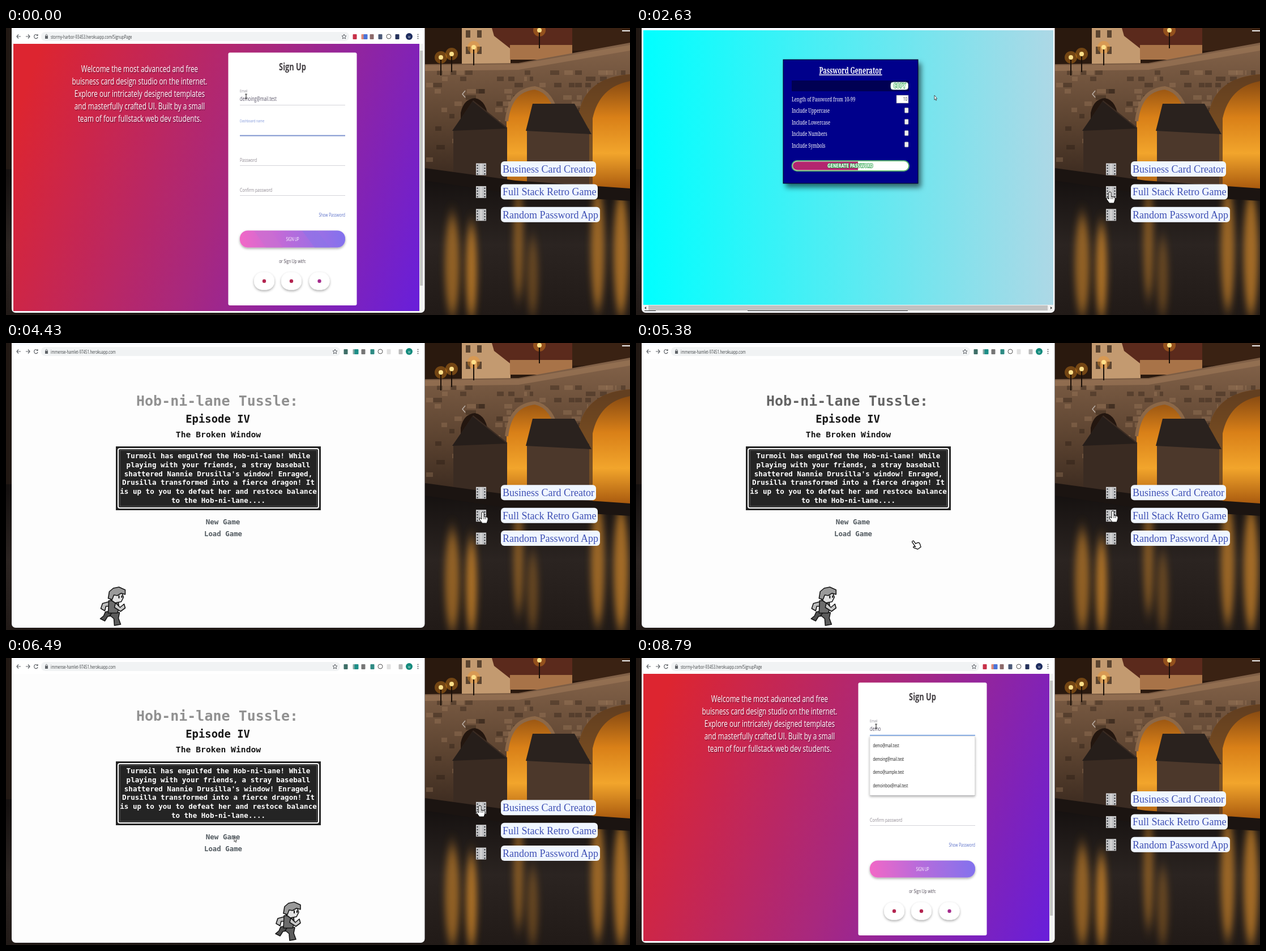
Recreate the animation shown at these times as an HTML page. Size 1102 by 508 pixels, loop 8960 ms.

```html
<!DOCTYPE html>
<html lang="en">
<head>
<meta charset="utf-8">
<title>Project carousel</title>
<style>
  html, body { margin: 0; width: 100%; height: 100%; overflow: hidden; background: #17110e; }
  svg { display: block; width: 1102px; height: 508px; }
  text { white-space: pre; }
</style>
</head>
<body>
<svg id="stage" viewBox="0 0 1102 508" xmlns="http://www.w3.org/2000/svg"></svg>
<script>
const LOOP = 8960, TICK = 79.2, ANCHOR = 4430;
const TO_PASSWORD = 1700, TO_GAME = 4260, TO_SIGNUP = 6650;
const SQUEEZE = 0.69; // the recorded browser pages are narrowed as a whole
const SANS = "'Open Sans','Noto Sans',sans-serif";
const SERIF = "'Noto Serif',serif";
const MONO = "'DejaVu Sans Mono',monospace";
const HEAVY = "'DejaVu Sans',sans-serif";

const rect = (x, y, w, h, fill, more = '') =>
  `<rect x="${x}" y="${y}" width="${w}" height="${h}" fill="${fill}" ${more}/>`;
const circle = (x, y, r, fill, more = '') =>
  `<circle cx="${x}" cy="${y}" r="${r}" fill="${fill}" ${more}/>`;
const path = (d, fill, more = '') => `<path d="${d}" fill="${fill}" ${more}/>`;
const line = (d, color, width = 1, more = '') =>
  path(d, 'none', `stroke="${color}" stroke-width="${width}" ${more}`);
const group = (id, body, more = '') => `<g id="${id}" ${more}>${body}</g>`;

function label(x, y, str, size, fill, o = {}) {
  return `<text transform="translate(${x} ${y}) scale(${o.squeeze ?? SQUEEZE} 1)" font-size="${size}" fill="${fill}"
    font-family="${o.font ?? SANS}" font-weight="${o.weight ?? 400}" text-anchor="${o.anchor ?? 'start'}"
    ${o.id ? `id="${o.id}"` : ''} ${o.more ?? ''}>${str}</text>`;
}

function gradient(id, x1, y1, x2, y2, ...colors) {
  const stops = colors.map((c, i) => `<stop offset="${i / (colors.length - 1)}" stop-color="${c}"/>`);
  return `<linearGradient id="${id}" gradientUnits="userSpaceOnUse" x1="${x1}" y1="${y1}" x2="${x2}" y2="${y2}">${stops.join('')}</linearGradient>`;
}

let seed = 7;
const random = () => (seed = seed * 16807 % 2147483647) / 2147483647;

const defs = `<defs>
  ${gradient('sunset', 30, 120, 760, 380, '#dd2530', '#a8287e', '#6a1fd8')}
  ${gradient('aqua', 13, 0, 737, 0, '#00ffff', '#add8e6')}
  ${gradient('button', 413, 385, 599, 362, '#f268c6', '#b46cdc', '#8272ee')}
  ${gradient('wall', 0, 40, 0, 290, '#806047', '#5d4431', '#33241b')}
  ${gradient('glow', 0, 95, 0, 285, '#8a4c12', '#d98018', '#f2a52c', '#a8590e')}
  ${gradient('water', 0, 260, 0, 508, '#14100f', '#2b2421', '#211a17')}
  <filter id="blur" x="-100%" width="300%" y="-20%" height="140%"><feGaussianBlur stdDeviation="6 14"/></filter>
  <filter id="soft" x="-20%" y="-50%" width="140%" height="220%"><feDropShadow dx="0" dy="2" stdDeviation="2" flood-opacity=".35"/></filter>
  <filter id="lift" x="-20%" y="-20%" width="150%" height="150%"><feDropShadow dx="5" dy="7" stdDeviation="5" flood-opacity=".55"/></filter>
  <clipPath id="page"><rect x="13" y="4" width="724" height="497"/></clipPath>
</defs>`;

function photo() {
  let s = rect(0, 0, 1102, 508, '#211813') + rect(740, 0, 362, 100, '#2a190e');
  s += rect(805, 0, 86, 66, '#c39a70') + path('M858,0H1010V36H890L862,14Z', '#5b2a1c');
  s += rect(890, 30, 110, 26, '#a87348') + rect(1000, 0, 102, 40, '#3a2213');
  for (let x = 812; x < 850; x += 20) s += rect(x, 4, 8, 13, '#5b4430') + rect(x, 33, 8, 13, '#5b4430');
  s += rect(0, 250, 1102, 258, 'url(#water)');
  const streaks = [[788, 420, 13, 90, .6], [822, 430, 10, 85, .75], [905, 380, 9, 100, .5],
    [930, 440, 10, 70, .35], [1045, 390, 12, 110, .65], [1086, 400, 13, 110, .7]];
  for (const [x, y, rx, ry, a] of streaks)
    s += `<ellipse cx="${x}" cy="${y}" rx="${rx}" ry="${ry}" fill="#d58a2c" opacity="${a}" filter="url(#blur)"/>`;
  s += path('M740,64L905,62L1102,26V292L740,254Z', 'url(#wall)');
  for (let i = 0; i < 130; i++) {
    const x = 742 + random() * 350, y = 75 + Math.floor(random() * 16) * 11;
    s += rect(x.toFixed(), y, 9 + Math.round(random() * 9), 8, random() < .5 ? '#a98463' : '#1c110b', 'opacity=".3"');
  }
  s += path('M740,66L905,64L1102,30V40L905,74L740,76Z', '#9a7656', 'opacity=".7"');
  s += path('M803,235V150Q808,126 828,124Q850,128 852,165V245Z', '#23160f') + path('M842,240V180L853,172V246Z', 'url(#glow)');
  s += path('M884,272V160Q890,110 934,106Q966,112 976,165V280Z', 'url(#glow)');
  s += path('M1012,290V150Q1024,88 1102,82V292Z', 'url(#glow)');
  s += path('M1012,290V150Q1024,88 1102,82V94Q1048,104 1036,160V290Z', '#5b3d24', 'opacity=".8"');
  s += path('M884,165Q890,110 934,106Q966,112 976,165', 'none', 'stroke="#8c6848" stroke-width="6"');
  s += path('M790,180L825,128L885,176V272L790,260Z', '#3a2b22') + path('M788,182L824,130L884,178Z', '#261e1a');
  s += path('M920,178H1030V288H920Z', '#4c382b') + path('M918,182L930,134H1004L1034,188Z', '#2a221e');
  s += path('M740,248L900,270L1102,284V306L900,294L740,270Z', '#1b1411');
  for (const [x, y] of [[768, 52], [787, 46], [826, 34], [942, 4]])
    s += circle(x, y, 11, '#ff9a20', 'opacity=".35"') + circle(x, y, 4, '#ffe08a') + line(`M${x},${y + 4}V${y + 32}`, '#1a0f08', 2);
  return s + line('M811,111L806,117L811,123', '#b9aea6', 1.5) + line('M1088,5H1102', '#eee', 2);
}

const key = (x) => group('key', circle(x - 2, 15, 2, 'none', 'stroke="#5f6368" stroke-width="1.3"') + line(`M${x},15H${x + 4}V17`, '#5f6368', 1.3));

function toolbar(url, star, icons, avatar) {
  let s = rect(13, 4, 724, 24, '#fff') + rect(62, 7, star + 9 - 62, 16, '#f1f3f4', 'rx="7"');
  s += line('M26,15H19M22,11.5L19,15L22,18.5M35,15H42M39,11.5L42,15L39,18.5', '#5f6368', 1.2);
  s += line('M55.5,13A3.2,3.6 0 1 0 56,16M56,11V13.5H53.5', '#5f6368', 1.2);
  s += rect(69, 14, 5, 5, '#5f6368') + line('M70,14V12.5Q71.5,10 73,12.5V14', '#5f6368');
  s += label(79, 18.5, url, 8.9, '#3c4043');
  s += path(`M${star},11l1.2,2.8 2.8,.2-2.1,2 .7,3-2.6-1.6-2.6,1.6 .7-3-2.1-2 2.8-.2Z`, 'none', 'stroke="#5f6368"');
  for (const [x, color, round] of icons)
    s += round ? circle(x, 15, 4, 'none', `stroke="${color}"`) : rect(x - 3.5, 11, 7, 9, color, 'rx="1"');
  s += circle(712, 15, 6, avatar) + label(712, 17.5, 'M', 6, '#fff', { anchor: 'middle' });
  for (const y of [11.5, 15, 18.5]) s += circle(727.5, y, 1, '#5f6368');
  return s;
}

function signupPage() {
  const mid = { anchor: 'middle' };
  let s = rect(13, 28, 724, 473, 'url(#sunset)');
  s += toolbar('stormy-harbor-93453.herokuapp.com/SignupPage', 597, [[616, '#c8324a'], [631, '#e08a78'],
    [635, '#4a74d8'], [646, '#8c6a6a'], [661, '#4b5a78'], [676, '#555', 1], [691, '#26335c']], '#1c2c5e') + key(581);
  s += rect(730, 28, 7, 473, '#f1f1f1') + rect(731, 40, 5, 416, '#c1c1c1');
  const welcome = ['Welcome the most advanced and free', 'buisness card design studio on the internet.',
    'Explore our intricately designed templates', 'and masterfully crafted UI. Built by a small', 'team of four fullstack web dev students.'];
  welcome.forEach((str, i) => {
    s += label(237, 79.5 + i * 22, str, 17, '#3a0f2c', { ...mid, more: 'opacity=".45"' });
    s += label(236, 78 + i * 22, str, 17, '#fff', mid);
  });
  s += rect(392.5, 43.5, 227, 447.5, '#fff', 'rx="3"') + label(506, 75, 'Sign Up', 18.6, '#403c40', { ...mid, weight: 700 });
  for (const y of [136.5, 190.5, 243.5, 296.5]) s += line(`M413,${y}H599`, '#d4d4da');
  s += group('emailLabel', label(413, 130, 'Email', 9.7, '#8d8790'));
  s += group('emailSmall', label(413, 114, 'Email', 7.8, '#93909a'));
  s += label(413, 129, '', 10.4, '#555064', { id: 'emailValue' });
  s += group('dashLabel', label(413, 183.5, 'Dashboard name', 9.7, '#9a8d9a'));
  s += group('dashFocus', label(413, 167, 'Dashboard name', 7.8, '#7f97da') + rect(413, 189.5, 186, 2, '#7f93cf'));
  s += label(413, 182.5, '', 10.4, '#555064', { id: 'dashValue' }) + rect(413, 170, 1, 16, '#444', 'id="caret"');
  s += label(413, 236.5, 'Password', 9.7, '#8d8790') + label(413, 290, 'Confirm password', 9.7, '#8d8790');
  s += label(599, 333.5, 'Show Password', 9.3, '#5b70c8', { anchor: 'end' });
  s += rect(413, 358.5, 186, 30, 'url(#button)', 'rx="14" filter="url(#soft)"');
  s += group('stripes', path('M438,359H468L489,388.500H459Z', '#c96fd2', 'opacity=".55"') + path('M523,359H550L572,388.5H545Z', '#8b76ea', 'opacity=".55"'));
  s += label(506, 377, 'SIGN UP', 8.6, '#fff', mid) + label(506, 415.5, 'or Sign Up with:', 9.4, '#4b4350', mid);
  [[456, '#b3244f'], [504, '#b3244f'], [553.5, '#a42a8c']].forEach(([x, color]) => {
    s += rect(x - 18, 432.500, 36, 31, '#fff', 'rx="15" filter="url(#soft)"') + circle(x, 448, 3.2, color);
  });
  const mails = ['demo@mail.test', 'demoing@mail.test', 'demo@sample.test', 'demoinbox@mail.test'];
  s += group('dropdown', rect(413, 136, 186, 1.5, '#6a9ae2') +
    rect(413, 138.5, 185.5, 104.5, '#fff', 'rx="1" stroke="#d0d0d0" stroke-width=".6" filter="url(#soft)"') +
    mails.map((m, i) => label(418.5, 158 + i * 23.6, m, 8.8, '#151515')).join(''));
  s += group('ibeam', line('M422,117H426M424,117V125M422,125H426', '#333', 1.2));
  return group('signup', s);
}

function passwordPage() {
  let s = rect(13, 4, 724, 486, 'url(#aqua)') + rect(13, 490, 724, 11, '#f1f1f1') + rect(22, 491, 705, 9, '#c1c1c1');
  s += path('M18,493V498L15,495.5ZM732,493V498L735,495.5Z', '#444') + line('M15,500.5H35M197,500.5H480', '#333');
  s += rect(260, 56, 238, 219, '#00008b', 'stroke="#05051e" filter="url(#lift)"');
  s += label(379, 81, 'Password Generator', 15.6, '#fff', { anchor: 'middle', font: SERIF, weight: 700, more: 'text-decoration="underline"' });
  s += rect(275, 93, 207, 19, '#000053');
  const outlined = { anchor: 'middle', font: HEAVY, weight: 700, more: 'stroke="#2fa84f" stroke-width="1.8" paint-order="stroke"' };
  s += rect(450, 96, 30.5, 13, '#fff', 'rx="4" stroke="#b8d8c0"') + label(465.5, 106, 'COPY', 10.5, '#fff', outlined);
  ['Length of Password from 10-99', 'Include Uppercase', 'Include Lowercase', 'Include Numbers', 'Include Symbols'].forEach((str, i) => {
    s += label(275, 130 + i * 20.4, str, 11, '#fff', { font: SERIF });
    if (i) s += rect(474.5, 121 + i * 20.2, 6.5, 9, '#eee', 'rx="1" stroke="#999" stroke-width=".6"');
  });
  s += rect(460, 119, 21, 14, '#fff', 'stroke="#888" stroke-width=".6"') + label(479, 129, '10', 9, '#333', { anchor: 'end' });
  s += rect(275.5, 235, 206.5, 18, '#fff', 'rx="9" stroke="#8ed09a" stroke-width="2"');
  s += path('M392,236.5H285Q277,237 277,244T285,251.500H392Z', '#b3266f') + rect(275.5, 235, 206.5, 18, 'none', 'rx="9" stroke="#2f9a4a"');
  s += label(378.5, 247.3, 'GENERATE PASSWORD', 9.3, '#fff', outlined);
  return group('password', s);
}

function runner() {
  const ink = 'stroke="#161616" stroke-width="1.6" stroke-linejoin="round"';
  const shape = (d, fill) => path(d, fill, ink);
  let s = group('strideA', shape('M-3,42L-13,44L-16,51L-22,56L-14,60L-9,52L6,50Z', '#505050') +
    shape('M0,44L12,45L10,55L14,66L3,68L2,56L-5,50Z', '#5c5c5c'));
  s += group('strideB', shape('M-4,43L-8,55L-15,63L-7,68L1,57L7,48Z', '#505050') +
    shape('M1,44L13,46L17,55L22,58L15,64L8,55L-3,50Z', '#5c5c5c'));
  s += shape('M-7,26L-18,29L-21,38L-14,42L-12,34L-4,34Z', '#bdbdbd') + shape('M-7,24L10,25L11,38L8,46L-8,46Z', '#6c6c6c');
  s += shape('M5,28L13,36L20,30L22,37L14,43L3,36Z', '#c9c9c9');
  s += shape('M-5,12L16,10L19,18L15,26L4,28L-4,22Z', '#e2e2e2') + rect(10, 15, 2, 5, '#111') + rect(15, 15, 2, 4, '#111');
  s += shape('M-8,20L-6,8L1,2L11,0L22,5L22,13L15,11L8,15L2,14L-1,22Z', '#9a9a9a');
  return group('runner', s);
}

function gamePage() {
  const mono = (y, str, size, fill, weight = 700, x = 373) =>
    label(x, y, str, size, fill, { anchor: 'middle', font: MONO, weight, squeeze: 1 });
  let s = rect(13, 4, 724, 497, '#fdfdfd') + toolbar('immense-hamlet-97451.herokuapp.com', 581, [[600, '#3f6f68'], [616, '#8aa8a4'],
    [619, '#1c8f88'], [631, '#777'], [647, '#2f8b84'], [661, '#555', 1], [676, '#e2e2e2'], [697, '#bbb']], '#128a7c');
  s += group('gameTitle', mono(111, 'Hob-ni-lane Tussle:', 25, 'currentColor'));
  s += mono(141, 'Episode IV', 18.9, '#171717', 700, 374) + mono(166.5, 'The Broken Window', 14.7, '#171717', 700, 375);
  s += rect(194, 183, 362, 113, '#242424') + rect(198, 187, 354, 105, 'none', 'rx="3" stroke="#fff" stroke-width="2"');
  s += rect(201, 190, 348, 99, 'none', 'stroke="#777" stroke-width=".7"');
  ['Turmoil has engulfed the Hob-ni-lane! While', 'playing with your friends, a stray baseball',
    "shattered Nannie Drusilla's window! Enraged,", 'Drusilla transformed into a fierce dragon! It',
    'is up to you to defeat her and restoce balance', 'to the Hob-ni-lane....'].forEach((str, i) => {
    s += mono(204 + i * 15.75, str, 12.56, '#fff', 700, 375);
  });
  s += mono(320.5, 'New Game', 12.6, '#525a60', 700, 383) + mono(341.5, 'Load Game', 12.4, '#525a60', 700, 383.5);
  return group('game', s + runner());
}

function links() {
  const film = (y) => {
    let s = rect(830, y - 10.5, 18, 21, '#cfcfd0');
    for (let i = -8; i < 10; i += 5) s += rect(831.5, y + i, 2, 2.5, '#30343a') + rect(844.5, y + i, 2, 2.5, '#30343a');
    return s + line(`M835.5,${y - 10}V${y + 10}M842.500,${y - 10}V${y + 10}`, '#9fa3a8', .8);
  };
  return group('links', [['Business Card Creator', 168], ['Full Stack Retro Game', 171], ['Random Password App', 175]].map(([str, w], i) => {
    const y = 250 + i * 40.4;
    return film(y) + rect(874, y - 14, w, 27, '#f0f6ff', 'rx="6"') +
      label(877, y + 6, str, 18, '#3f51b5', { font: "'Liberation Serif',serif", squeeze: 1 });
  }).join(''));
}

const arrowPath = 'M0,0V11L2.6,8.6L4.500,12.5L6.300,11.6L4.6,8H8Z';
const handPath = 'M-3,-9Q-1,-11 1,-9V-2L6,-1Q9,0 8,4L6,10H-2L-7,3Q-8,0 -5,1L-3,3Z';
const outline = 'stroke="#111" stroke-width="1"';

document.getElementById('stage').innerHTML = defs + photo() + rect(10, -8, 729.5, 512, '#f8fafe', 'rx="7"') +
  `<g clip-path="url(#page)">${signupPage() + passwordPage() + gamePage()}</g>` + links() +
  group('pageArrow', path(arrowPath, '#fff', outline + ' transform="scale(.6 .75)"')) +
  group('glove', path(handPath, '#fff', 'stroke="#111" stroke-width="1.6" transform="rotate(-35) scale(.85)"')) +
  group('hand', path(handPath, '#fff', outline) + line('M1,-2V3M4,-1V3', '#111', .8)) +
  group('arrow', path(arrowPath, '#fff', outline + ' transform="scale(1.2)"'));

const $ = Object.fromEntries([...document.querySelectorAll('[id]')].map(el => [el.id, el]));
const show = (el, on) => { el.style.display = on ? '' : 'none'; };
const move = (el, [x, y]) => el.setAttribute('transform', `translate(${x.toFixed(1)} ${y.toFixed(1)})`);

// Rows are [time, x, y].
const pointer = [[360, 1020, 470], [700, 910, 400], [1100, 838, 338], [2310, 838, 338], [2560, 838, 300], [4100, 838, 300],
  [4260, 843, 309], [5200, 843, 309], [5350, 843, 307], [6160, 843, 307], [6400, 838, 271], [7710, 838, 271], [8560, 1015, 500]];
const passwordCursor = [[2310, 548, 165], [2600, 527, 119], [2700, 527, 119], [2860, 491, 93],
  [3180, 491, 93], [3500, 470, 125], [3800, 477, 165], [4040, 477, 205]];
const gameCursor = [[4980, 680, 450], [5120, 615, 400], [5250, 537, 366], [5360, 494, 357], [5460, 494, 357], [5900, 403, 317]];
const signupCursor = [[7100, 698, 378], [7300, 669, 222], [7420, 630, 170], [7560, 424, 120]];

function along(keys, t) {
  const i = keys.findIndex(k => k[0] > t);
  if (i === 0) return keys[0].slice(1);
  if (i < 0) return keys[keys.length - 1].slice(1);
  const [a, b] = [keys[i - 1], keys[i]], p = (t - a[0]) / (b[0] - a[0]);
  return [a[1] + (b[1] - a[1]) * p, a[2] + (b[2] - a[2]) * p];
}

function render(t) {
  const tick = Math.floor((t - ANCHOR) / TICK + .01), held = ANCHOR + tick * TICK;
  const onPassword = t >= TO_PASSWORD && t < TO_GAME, onGame = t >= TO_GAME && t < TO_SIGNUP;
  const onSignup = !onPassword && !onGame;
  show($.signup, onSignup);
  show($.password, onPassword);
  show($.game, onGame);
  move($.links, [0, onGame ? 15.3 : 0]);

  const filled = t < 1290, typing = t >= 7900;
  show($.key, t >= 1290 && t < 8000);
  show($.emailLabel, !filled && !typing);
  show($.emailSmall, filled || typing);
  show($.dashFocus, filled);
  show($.dashLabel, !filled);
  show($.stripes, filled);
  show($.caret, t >= 120 && t < 360);
  show($.dropdown, t >= 8100);
  show($.ibeam, filled || t >= 7540);
  const typed = t < 8400 ? 0 : t < 8710 ? 1 : t < 8790 ? 3 : 4;
  $.emailValue.textContent = filled ? 'demoing@mail.test' : 'demo'.slice(0, typed);
  $.dashValue.textContent = filled ? 'demo'.slice(0, Math.max(0, Math.floor((t - 160) / 200))) : '';

  move($.runner, [188.5 + (held - ANCHOR) * .1503, 432]);
  show($.strideA, tick % 2 === 0);
  show($.strideB, tick % 2 !== 0);
  const shade = Math.round(122 - 23 * Math.cos((t - 5460) * Math.PI / 1030));
  $.gameTitle.style.color = `rgb(${shade},${shade},${shade})`;

  const cursor = onPassword ? passwordCursor : onGame ? gameCursor : signupCursor;
  const visible = held + TICK > cursor[0][0] && !(onSignup && (t < TO_SIGNUP || t >= 7540));
  const gloved = onGame && t < 5500;
  show($.pageArrow, visible && !gloved);
  show($.glove, visible && gloved);
  move($.pageArrow, along(cursor, held));
  move($.glove, along(cursor, held));

  const at = along(pointer, held), present = t >= 360 && t < 8560, overFilm = at[0] < 855;
  show($.hand, present && overFilm);
  show($.arrow, present && !overFilm);
  move($.hand, at);
  move($.arrow, at);
}

const start = performance.now();
function frame(now) {
  render(Math.max(0, now - start) % LOOP);
  requestAnimationFrame(frame);
}
render(0);
requestAnimationFrame(frame);
</script>
</body>
</html>
```
